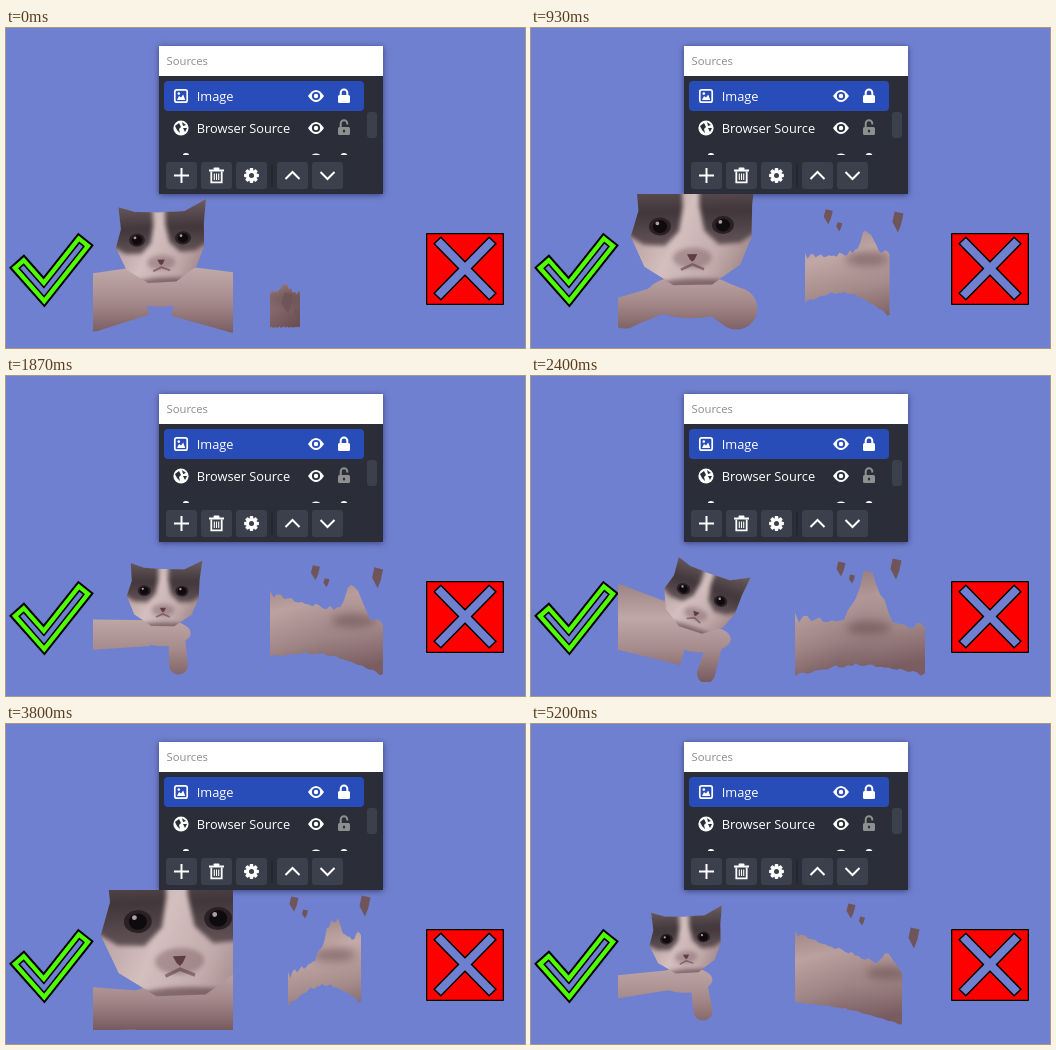
Animation, 519 px wide and 320 px high, one loop 5270 ms. Source, as an HTML page with a canvas:

```html
<!DOCTYPE html>
<html lang="en">
<head>
<meta charset="utf-8">
<title>Sources</title>
<style>
  html, body { margin: 0; width: 100%; height: 100%; overflow: hidden; background: #7080d0; }
  canvas { display: block; width: 519px; height: 320px; }
</style>
</head>
<body>
<canvas id="stage" width="519" height="320"></canvas>
<script>
const ctx = document.getElementById('stage').getContext('2d');
const BG = '#7080d0', DARK = '#2b2e38', GREY = '#3c404d', BLUE = '#284cb8';
const LOOP = 5270;

// ---------- drawing helpers ----------
function poly(pts, shut) {
  ctx.beginPath();
  for (let i = 0; i < pts.length; i += 2) ctx.lineTo(pts[i], pts[i + 1]);
  if (shut) ctx.closePath();
}
function fillPoly(pts, fill) { poly(pts, true); ctx.fillStyle = fill; ctx.fill(); }
function line(pts, color, width) {
  poly(pts);
  ctx.strokeStyle = color;
  ctx.lineWidth = width;
  ctx.stroke();
}
function box(x, y, w, h, r, fill) {
  ctx.beginPath();
  ctx.roundRect(x, y, w, h, r);
  ctx.fillStyle = fill;
  ctx.fill();
}
function oval(x, y, rx, ry, fill) {
  ctx.beginPath();
  ctx.ellipse(x, y, rx, ry, 0, 0, 7);
  ctx.fillStyle = fill;
  ctx.fill();
}
function ramp(x0, y0, x1, y1, ...colors) {
  const g = ctx.createLinearGradient(x0, y0, x1, y1);
  colors.forEach((c, i) => g.addColorStop(i / (colors.length - 1), c));
  return g;
}
function clipTo(x, y, w, h) {
  ctx.beginPath();
  ctx.rect(x, y, w, h);
  ctx.clip();
}
function text(s, x, y, size, color) {
  ctx.font = size + 'px "Open Sans", "Noto Sans", sans-serif';
  ctx.fillStyle = color;
  ctx.fillText(s, x, y);
}

// ---------- panel ----------
function eyeIcon(x, y, back) {
  ctx.beginPath();
  ctx.moveTo(x - 8, y);
  ctx.quadraticCurveTo(x, y - 12, x + 8, y);
  ctx.quadraticCurveTo(x, y + 12, x - 8, y);
  ctx.fillStyle = '#fff';
  ctx.fill();
  oval(x, y, 4.1, 4.1, back);
  oval(x, y, 2.2, 2.2, '#fff');
}
function lockIcon(x, y, open, color) {
  const top = y - (open ? 4.5 : 3.2);
  box(x - 6, y - 1, 12, 8, 1.5, color);
  ctx.beginPath();
  ctx.moveTo(x - 3.3, y);
  ctx.arc(x, top, 3.3, Math.PI, 0);
  ctx.lineTo(x + 3.3, open ? top + 1 : y);
  ctx.strokeStyle = color;
  ctx.lineWidth = 2;
  ctx.stroke();
  if (open) oval(x, y + 3, 1.2, 1.6, DARK);
}
function pictureIcon(x, y) {
  ctx.beginPath();
  ctx.roundRect(x - 6.2, y - 6.2, 12.4, 12.4, 2);
  ctx.strokeStyle = '#fff';
  ctx.lineWidth = 1.7;
  ctx.stroke();
  oval(x - 2.2, y - 2.4, 1.3, 1.3, '#fff');
  fillPoly([x - 4, y + 4, x - 2, y, x, y + 1.5, x + 2.2, y - 1.5, x + 4.2, y + 4], '#fff');
}
function globeIcon(x, y) {
  oval(x, y, 7.6, 7.6, '#fff');
  fillPoly([x - 6, y - 2, x - 2, y - 5, x, y - 1, x - 2, y + 1, x - 1, y + 5, x - 4, y + 2], DARK);
  fillPoly([x + 1, y - 6, x + 5, y - 3, x + 2, y - 2], DARK);
  fillPoly([x + 2, y, x + 6, y, x + 4, y + 4], DARK);
}
function gearIcon(x, y) {
  ctx.save();
  ctx.translate(x, y);
  for (let i = 0; i < 8; i++) {
    box(-1.8, -7.4, 3.6, 4, .8, '#fff');
    ctx.rotate(Math.PI / 4);
  }
  ctx.restore();
  oval(x, y, 5.6, 5.6, '#fff');
  oval(x, y, 2.5, 2.5, GREY);
}
function binIcon(x, y) {
  box(x - 7.5, y - 6, 15, 2, 0, '#fff');
  box(x - 3, y - 8, 6, 2.5, 1, '#fff');
  line([x - 5.2, y - 4, x - 5.2, y + 6.8, x + 5.2, y + 6.8, x + 5.2, y - 4], '#fff', 1.8);
  for (const dx of [-2.2, 0, 2.2]) line([x + dx, y - 2, x + dx, y + 4.5], '#fff', 1.1);
}
function chevron(x, y, dir) {
  line([x - 7, y + 3.5 * dir, x, y - 3.5 * dir, x + 7, y + 3.5 * dir], '#fff', 2);
}

function panel() {
  ctx.save();
  ctx.shadowColor = 'rgba(20,24,60,.6)';
  ctx.shadowBlur = 6;
  ctx.shadowOffsetY = 1;
  box(153, 18, 224, 148, 0, DARK);
  ctx.restore();
  box(153, 18, 224, 30, 0, '#fff');
  text('Sources', 160.5, 37, 11.3, '#8c8c8c');

  box(158, 53, 200, 30, 4, BLUE);
  pictureIcon(175, 68);
  text('Image', 190.7, 73, 12.8, '#fff');
  eyeIcon(310, 68, BLUE);
  lockIcon(338, 68, false, '#fff');

  globeIcon(175, 100);
  text('Browser Source', 190.7, 105, 12.8, '#fff');
  eyeIcon(310, 100, DARK);
  lockIcon(338, 100, true, '#8f8f8f');

  ctx.save();
  clipTo(158, 120, 200, 7);
  oval(180, 127, 3, 2, '#fff');
  oval(310, 128.5, 5, 3, '#fff');
  oval(338, 128, 3.5, 3, '#fff');
  ctx.restore();
  box(361, 84, 10, 26, 3, GREY);

  for (const x of [160, 195, 230, 271, 306]) box(x, 134, 31, 27, 3, GREY);
  box(265.5, 136, 1, 23, 0, '#1e2028');
  line([168, 147.5, 183, 147.5], '#fff', 2);
  line([175.5, 140, 175.5, 155], '#fff', 2);
  binIcon(210.5, 147.5);
  gearIcon(245.5, 147.5);
  chevron(286.5, 147.5, 1);
  chevron(321.5, 147.5, -1);
}

// ---------- tick and cross: one path, stroked in shrinking layers ----------
function marks() {
  const layers = [[0, '#000'], [2, '#50ff00'], [6.3, '#000'], [7.8, BG]];
  for (const [t, color] of layers) {
    line([10.5 + .7 * t, 233 + .75 * t, 38, 264, 80 - .62 * t, 211 + .78 * t], color, 20 - 2 * t);
  }
  box(420, 205, 78, 72, 1, '#000');
  box(421.3, 206.3, 75.4, 69.4, 0, '#f00');
  for (const [inset, color, width] of [[0, '#000', 11], [1, BG, 8]]) {
    for (const side of [-1, 1]) {
      const dx = (28 - inset) * side, dy = 28.5 - inset;
      line([459 - dx, 240.5 - dy, 459 + dx, 240.5 + dy], color, width);
    }
  }
}

// ---------- cat ----------
// head: x, y, size, tilt; paws: x, y, arm width
const wide = { head: [154, 211, 47, -.05], left: [84, 275, 58], right: [231, 275, 60], dark: [0] };
const close = { head: [172, 196, 82, -.04], left: [84, 285, 44], right: [232, 278, 60], dark: [0] };
const stand = { head: [146, 200, 42, 0], left: [106, 284, 17], right: [172, 284, 19], dark: [0] };
const tilt = { head: [171, 219, 40, .32], left: [80, 239, 64], right: [175, 298, 18], dark: [0] };
const rest = { head: [166, 218, 49, .04], left: [82, 276, 60], right: [232, 276, 60], dark: [0] };
const cover = { head: [160, 190, 240, 0], left: [84, 285, 60], right: [232, 285, 60], dark: [1] };
const bend = { head: [154, 214, 38, -.06], left: [84, 263, 23], right: [172, 287, 19], dark: [0] };
const catTrack = [[0, wide], [8, close], [21, stand], [25, bend], [36, tilt], [48, rest],
  [57, close], [65, cover], [73, stand], [78, bend]];

const HEAD = [-.95, .15, -.82, -.25, -.85, -.72, -.5, -.6, 0, -.57, .55, -.57, 1.02, -.8,
  .95, -.3, .93, .2, .75, .62, .3, .92, -.3, .92, -.75, .62];
const PATCH = [-1.1, -1.1, -.14, -1.1, -.13, -.3, -.2, .08, -.42, .3, -.75, .28, -1.1, .05];
const NOSE = [-.08, .44, .08, .44, .04, .52, 0, .56, -.04, .52];
const mirror = pts => pts.map((v, i) => i % 2 ? v : -v);

function arm(x, y, [px, py, w]) {
  const a = Math.atan2(py - y, px - x), nx = -Math.sin(a) * w / 2, ny = Math.cos(a) * w / 2;
  fillPoly([x + nx * .85, y + ny * .85, px + nx, py + ny, px - nx, py - ny, x - nx * .85, y - ny * .85], ctx.fillStyle);
  oval(px, py, w * .5, w * .5, ctx.fillStyle);
}

function drawHead([x, y, s, turn]) {
  ctx.save();
  ctx.translate(x, y);
  ctx.rotate(turn);
  ctx.scale(s, s);
  poly(HEAD, true);
  ctx.clip();
  ctx.fillStyle = ramp(-.9, 0, .9, .9, '#b9a0a0', '#d3bfbe', '#c3abab', '#967b7d');
  ctx.fill();
  ctx.filter = 'blur(2px)';
  oval(0, 1.02, .8, .2, 'rgba(85,58,62,.6)');
  const fur = ramp(0, -.8, 0, .35, '#6b5d61', '#41363a', '#66565a');
  fillPoly(PATCH, fur);
  fillPoly(mirror(PATCH), fur);
  oval(0, .5, .3, .16, 'rgba(112,80,84,.4)');
  ctx.filter = 'blur(.7px)';
  for (const ex of [-.49, .49]) {
    oval(ex, 0, .17, .14, '#2b2024');
    oval(ex, 0, .11, .1, '#0f0a0d');
    oval(ex - .04, -.05, .03, .03, '#a9a0a2');
  }
  fillPoly(NOSE, '#5f3d42');
  line([-.18, .68, 0, .6, .18, .68], 'rgba(85,58,62,.55)', .04);
  ctx.restore();
}

function drawCat({ head, left, right, dark }) {
  const [x, y, s] = head, chest = y + 1.1 * s;
  ctx.save();
  clipTo(87, 166, 140, 140);
  ctx.fillStyle = ramp(0, 210, 0, 306, '#a08586', '#c0a8a7', '#a68a8b', '#775a5e');
  oval(x, chest, s * .72, s * .34, ctx.fillStyle);
  arm(x - s * .35, chest, left);
  arm(x + s * .35, chest, right);
  drawHead(head);
  ctx.globalAlpha = dark[0];
  box(87, 166, 140, 140, 0, ramp(87, 250, 227, 215, '#a68887', '#806465', '#604547', '#37211f', '#1e1114'));
  ctx.restore();
}

// ---------- torn remains ----------
// x: ends; top, foot: heights at both ends; peak: place, height; rough: jag, arch; bits: two places
const stub = { x: [264, 294], top: [264, 264], foot: [299, 299], peak: [.5, 8], rough: [5, 0], bits: [280, 275, 282, 275], dark: [.7] };
const spike = { x: [282, 355], top: [252, 208], foot: [281, 279], peak: [.62, 30], rough: [9, 19], bits: [288, 180, 359, 182], dark: [0] };
const reach = { x: [264, 363], top: [198, 244], foot: [265, 300], peak: [.88, 14], rough: [4, 12], bits: [309, 200, 377, 209], dark: [.1] };
const spread = { x: [264, 394], top: [242, 249], foot: [299, 299], peak: [.57, 52], rough: [10, 10], bits: [310, 193, 365, 193], dark: [.2] };
const torn = { x: [264, 394], top: [222, 208], foot: [299, 299], peak: [.52, 40], rough: [16, 0], bits: [294, 187, 372, 194], dark: [.8] };
const strip = { x: [264, 354], top: [262, 230], foot: [277, 280], peak: [.33, 10], rough: [8, 14], bits: [299, 190, 360, 201], dark: [0] };
const drift = { x: [264, 371], top: [209, 248], foot: [278, 301], peak: [.87, 15], rough: [4, 4], bits: [320, 187, 383, 214], dark: [.15] };
const scrapTrack = [[0, stub], [8, spike], [21, reach], [36, spread], [48, torn],
  [57, spike], [65, strip], [78, drift]];

const COLS = 32;
let seed = 7;
const noise = Array.from({ length: COLS + 1 }, () => (seed = seed * 16807 % 2147483647) / 2147483647 - .5);

const mix = (a, b, k) => a + (b - a) * k;

function pelt({ x, top, foot, peak: [at, high], rough: [jag, arch] }) {
  const upper = [], lower = [], wide = (4 + high * .22) / (x[1] - x[0]);
  for (let i = 0; i <= COLS; i++) {
    const u = i / COLS, px = mix(...x, u);
    const ridge = high * Math.exp(-(((u - at) / wide) ** 2));
    upper.push(px, mix(...top, u) - ridge + jag * noise[i]);
    lower.unshift(px, mix(...foot, u) - arch * Math.sin(u * Math.PI) + jag * .4 * noise[COLS - i]);
  }
  return upper.concat(lower);
}

function shred(x, y, w, h) {
  fillPoly([x - w * .3, y - h / 2, x + w / 2, y - h * .4, x + w * .3, y + h * .1,
    x, y + h / 2, x - w / 2, y], '#6f555a');
}

function drawScraps(pose) {
  const pts = pelt(pose), { x, top, peak, bits, dark } = pose;
  const px = mix(...x, peak[0]), py = mix(...top, peak[0]);
  ctx.save();
  clipTo(264, 171, 130, 131);
  ctx.save();
  poly(pts, true);
  ctx.clip();
  box(264, 171, 130, 131, 0, ramp(300, 190, 325, 300, '#9a7f80', '#c4aaa8', '#a88d8d', '#785b5f'));
  ctx.filter = 'blur(4px)';
  oval(px, py + 6, 22, 7, 'rgba(90,62,66,.45)');
  ctx.filter = 'none';
  ctx.globalAlpha = dark[0] * .8;
  box(264, 171, 130, 131, 0, ramp(264, 210, 394, 270, '#8f7375', '#6d5053', '#4a3135', '#745a5c', '#866b6c'));
  ctx.restore();
  const [ax, ay, bx, by] = bits;
  shred(ax, ay, 9, 15);
  shred(ax + 11, ay + 10, 6, 9);
  shred(bx, by, 11, 21);
  ctx.restore();
}

// ---------- time ----------
function poseAt(track, step) {
  let i = 0;
  while (i < track.length - 2 && track[i + 1][0] <= step) i++;
  const [t0, a] = track[i], [t1, b] = track[i + 1];
  const u = (step - t0) / (t1 - t0), k = u * u * (3 - 2 * u), pose = {};
  for (const key in a) pose[key] = a[key].map((v, n) => mix(v, b[key][n], k));
  return pose;
}

// Fifteen pictures a second, each starting on a whole hundredth.
function stepAt(t) {
  let k = Math.min(78, Math.ceil(t * 3 / 200));
  while (k > 0 && Math.round(k * 20 / 3) * 10 > t) k--;
  return k;
}

const start = performance.now();
function draw(now) {
  const step = stepAt(Math.max(0, now - start) % LOOP);
  ctx.fillStyle = BG;
  ctx.fillRect(0, 0, 519, 320);
  panel();
  marks();
  drawCat(poseAt(catTrack, step));
  drawScraps(poseAt(scrapTrack, step));
  requestAnimationFrame(draw);
}
draw(start);
</script>
</body>
</html>
```
